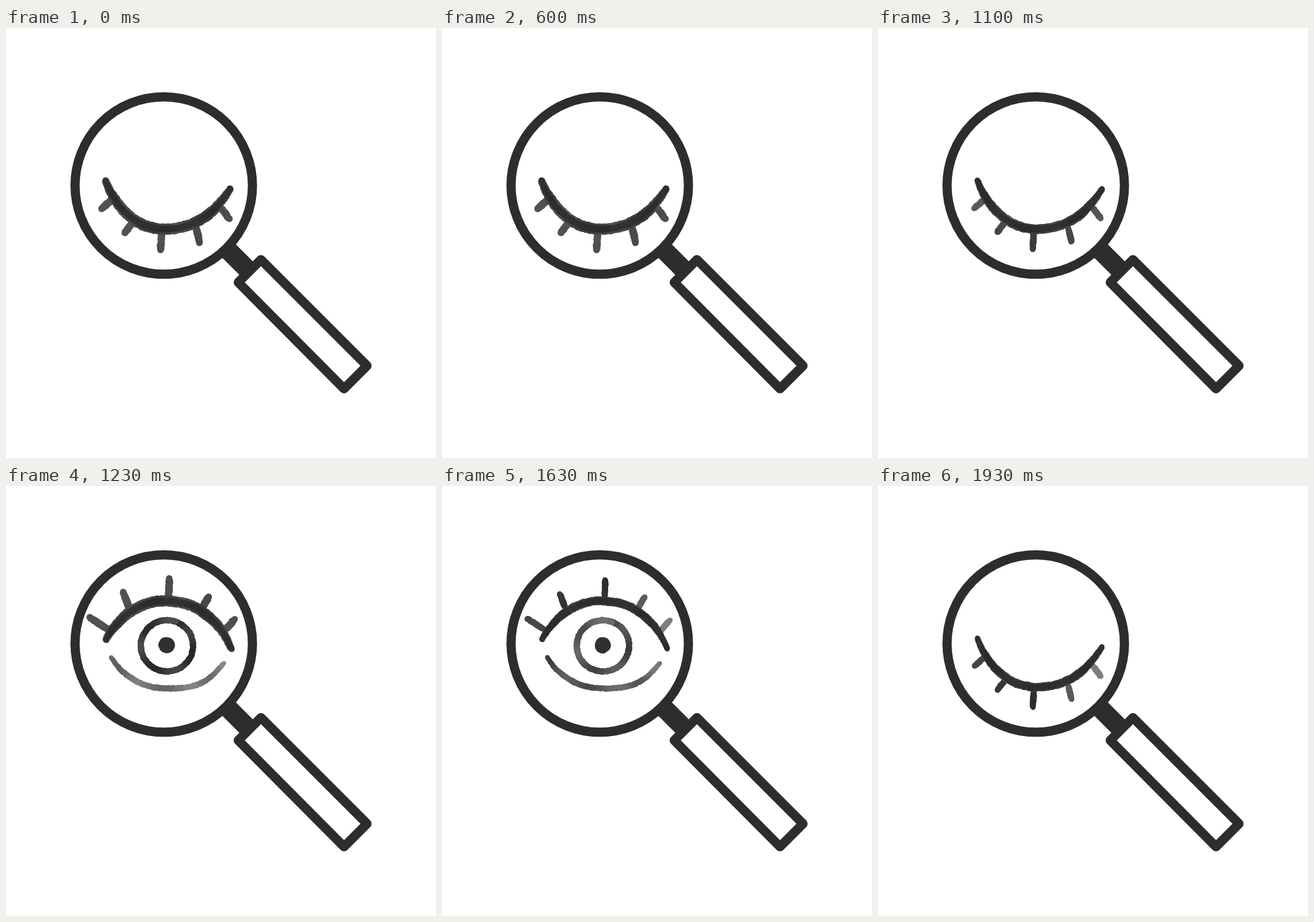
An HTML page with a canvas for the animation above (2010 ms loop, 748x748 px).

```html
<!DOCTYPE html>
<html lang="en">
<head>
<meta charset="utf-8">
<title>Blinking eye under a magnifying glass</title>
<style>
html, body { margin: 0; width: 100%; height: 100%; overflow: hidden; background: #fff; }
canvas { display: block; width: 748px; height: 748px; }
</style>
</head>
<body>
<canvas id="stage" width="748" height="748"></canvas>
<script>
const SIZE = 748, LOOP = 2010, INK = '#2d2d2d';
const ctx = document.getElementById('stage').getContext('2d');

// Anchor points of the hand-drawn lines
const closedLid = [[173, 265], [184, 289], [206, 319], [238, 342], [277, 350], [318, 343], [351, 325], [373, 303], [390, 280]];
const closedLashes = [[184, 299, 166, 315], [220, 339, 207, 356], [271, 355, 269, 387], [331, 348, 337, 373], [375, 314, 388, 332]];
const openLid = [[174, 267], [187, 247], [213, 221], [247, 204], [280, 200], [320, 207], [351, 226], [375, 251], [392, 283]];
const openLashes = [[178, 250, 146, 229], [214, 211, 204, 185], [283, 193, 284, 161], [342, 211, 353, 192], [381, 251, 398, 232]];
const lowerLid = [[183, 298], [202, 322], [238, 345], [280, 352], [325, 348], [355, 333], [379, 308]];

// Three brush takes of the same drawing
const takes = [
  { seed: 5, wide: 18.5, core: 11, lash: 12.5, reach: 1, greys: [80, 80, 80, 78, 82], low: [105, 125], iris: [48, 62], pupil: 13.5 },
  { seed: 17, wide: 14.5, core: 11, lash: 10.5, reach: 0.92, greys: [68, 54, 46, 90, 125], low: [72, 110], iris: [70, 95], pupil: 13 },
  { seed: 31, wide: 16, core: 11, lash: 11, reach: 0.94, greys: [88, 72, 58, 70, 84], low: [100, 85], iris: [62, 75], pupil: 13 }
];

// Start time, lid state, take
const steps = [];
for (let i = 0; i < 12; i++) steps.push([i * 100, 'closed', i % 3]);
steps.push([1200, 'closed', 1]);
for (let i = 0; i < 5; i++) steps.push([1230 + i * 100, 'open', i % 3]);
steps.push([1700, 'open', 0], [1730, 'open', 2], [1800, 'closed', 2], [1830, 'closed', 0], [1930, 'closed', 1]);

function seeded(s) {
  return () => {
    s = (s + 0x6D2B79F5) | 0;
    let t = Math.imul(s ^ (s >>> 15), 1 | s);
    t = (t + Math.imul(t ^ (t >>> 7), 61 | t)) ^ t;
    return ((t ^ (t >>> 14)) >>> 0) / 4294967296;
  };
}

const mix = (a, b, t) => a + (b - a) * t;

function spline(pts) {
  const at = i => pts[Math.max(0, Math.min(pts.length - 1, i))];
  return t => {
    const p = t * (pts.length - 1), i = Math.min(Math.floor(p), pts.length - 2), f = p - i;
    return [0, 1].map(k => {
      const [a, b, c, d] = [at(i - 1)[k], at(i)[k], at(i + 1)[k], at(i + 2)[k]];
      return b + f / 2 * (c - a + f * (2 * a - 5 * b + 4 * c - d + f * (3 * (b - c) + d - a)));
    });
  };
}

// Dabs along a path give the rough edge of a dry brush
function brush(g, rnd, path, length, width, shade, taper = 1, grain = 10) {
  const count = Math.ceil(length * 1.3), phase = rnd() * 9;
  for (let i = 0; i <= count; i++) {
    const t = i / count, [x, y] = path(t);
    const grey = mix(shade[0], shade[1], t) + grain * Math.sin(t * length / 13 + phase) + (rnd() - 0.5) * 6;
    const r = width / 2 * mix(taper, 1, Math.min(1, 1.4 * Math.sin(Math.PI * t))) * mix(0.88, 1.06, rnd());
    const v = Math.round(Math.max(40, grey));
    g.fillStyle = `rgb(${v},${v},${v})`;
    g.beginPath();
    g.arc(x + (rnd() - 0.5) * 1.4, y + (rnd() - 0.5) * 1.4, r, 0, 7);
    g.fill();
  }
}

function drawLashes(g, rnd, lashes, take) {
  lashes.forEach(([x0, y0, x1, y1], i) => {
    const path = t => [mix(x0, x1, t * take.reach), mix(y0, y1, t * take.reach)];
    brush(g, rnd, path, Math.hypot(x1 - x0, y1 - y0), take.lash, [take.greys[i], take.greys[i]], 0.9, 4);
  });
}

function drawLid(g, rnd, pts, take) {
  const path = spline(pts);
  brush(g, rnd, path, 270, take.wide, [72, 66], 0.6, 8);
  brush(g, rnd, path, 270, take.core, [47, 47], 0.75, 3);
}

function drawIris(g, rnd, take) {
  const ring = t => {
    const a = t * 2 * Math.PI - 1.2;
    return [280 + 45.5 * Math.cos(a), 278 + 44.5 * Math.sin(a)];
  };
  brush(g, rnd, ring, 285, 10.5, take.iris, 1, 16);
  const swirl = t => [279.5 + 4 * Math.cos(t * 7), 277 + 4 * Math.sin(t * 7)];
  brush(g, rnd, swirl, 26, take.pupil * 2 - 7, [46, 48], 1, 2);
}

function drawGlass(g) {
  g.strokeStyle = INK;
  g.lineJoin = 'round';
  g.lineWidth = 16;
  g.beginPath();
  g.arc(274.4, 274, 154.3, 0, 7);
  g.stroke();
  g.beginPath();
  g.moveTo(443.5, 403);
  g.lineTo(628, 587.5);
  g.lineTo(588, 627.5);
  g.lineTo(404, 442.5);
  g.closePath();
  g.stroke();
  g.lineWidth = 33;
  g.beginPath();
  g.moveTo(386, 386);
  g.lineTo(423, 423);
  g.stroke();
}

function makePose(state, take) {
  const sheet = document.createElement('canvas');
  sheet.width = sheet.height = SIZE;
  const g = sheet.getContext('2d'), rnd = seeded(take.seed);
  g.fillStyle = '#fff';
  g.fillRect(0, 0, SIZE, SIZE);
  const open = state === 'open';
  drawLashes(g, rnd, open ? openLashes : closedLashes, take);
  drawLid(g, rnd, open ? openLid : closedLid, take);
  if (open) {
    drawIris(g, rnd, take);
    brush(g, rnd, spline(lowerLid), 230, 10, take.low, 0.7, 14);
  }
  drawGlass(g);
  return sheet;
}

const poses = {
  closed: takes.map(t => makePose('closed', t)),
  open: takes.map(t => makePose('open', t))
};

function render() {
  const now = performance.now() % LOOP;
  const [, state, take] = steps.filter(s => s[0] <= now).pop();
  ctx.drawImage(poses[state][take], 0, 0);
  requestAnimationFrame(render);
}
render();
</script>
</body>
</html>
```
